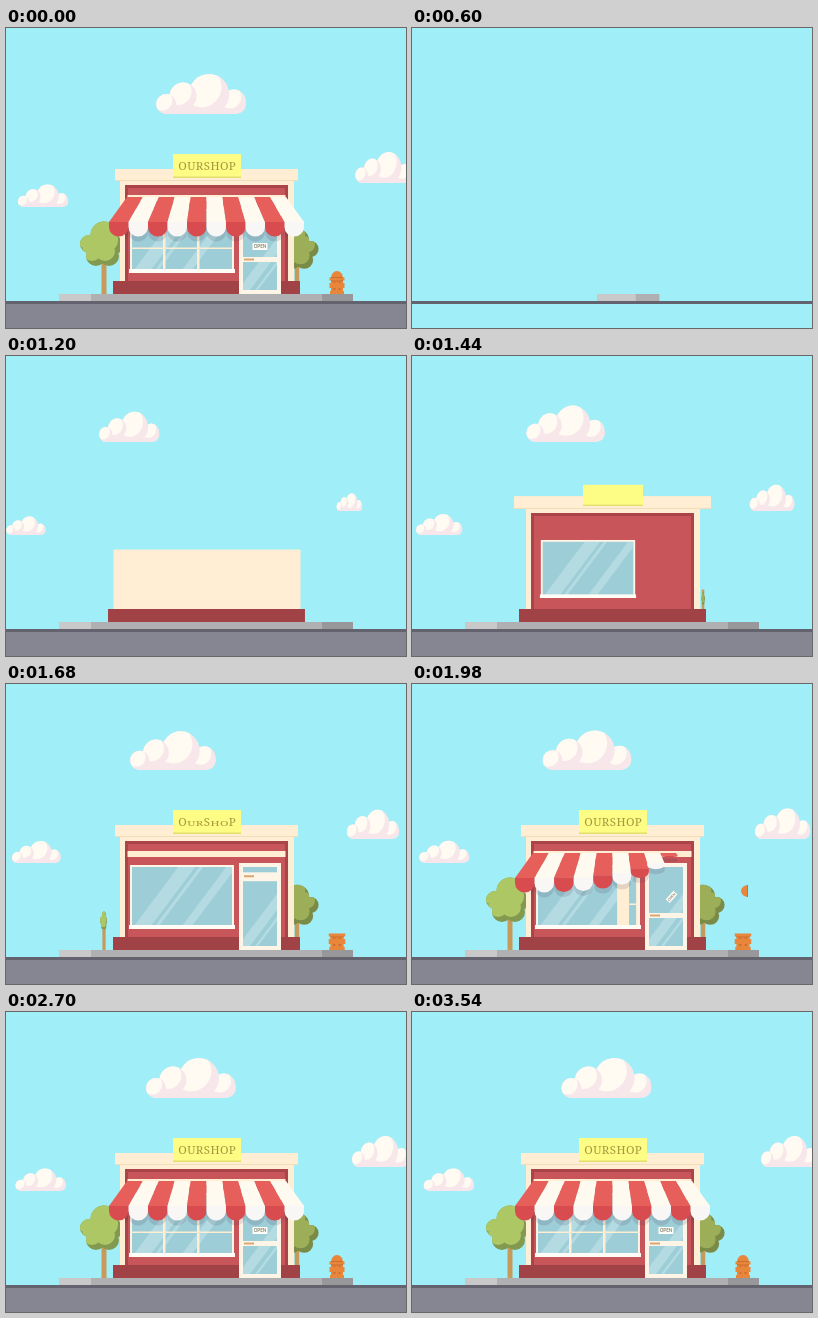
Animation of 400x300 px, one loop 3.6 s. Source, as an HTML page with a canvas:

```html
<!DOCTYPE html>
<html lang="en">
<head>
<meta charset="utf-8">
<title>Little shop</title>
<style>
html, body { margin: 0; width: 100%; height: 100%; overflow: hidden; background: #a0eef7; }
canvas { display: block; }
</style>
</head>
<body>
<canvas id="stage" width="400" height="300"></canvas>
<script>
const ctx = document.getElementById('stage').getContext('2d');
const LOOP = 3600, STEP = 60, SIGN = 'OURSHOP';
const CREAM = '#ffeed3', TRIM = '#fff5e6', GLASS = '#9dcdd6', GLEAM = '#b4dbe2';
let t = 0;

const mix = (a, b, k) => a + (b - a) * k;
const phase = (start, length) => Math.min(1, Math.max(0, (t - start) / length));
const easeOut = x => 1 - (1 - x) ** 3;
const easeInOut = x => x < .5 ? 2 * x * x : 1 - 2 * (1 - x) ** 2;
const overshoot = x => x <= 0 ? 0 : 1 + 2.7 * (x - 1) ** 3 + 1.7 * (x - 1) ** 2;

function rect(color, x, y, w, h) {
  ctx.fillStyle = color;
  ctx.fillRect(x, y, w, h);
}

function poly(color, ...points) {
  ctx.fillStyle = color;
  ctx.beginPath();
  for (const [x, y] of points) ctx.lineTo(x, y);
  ctx.fill();
}

// Draw around a pivot with its own scale and rotation.
function at(x, y, sx, sy, angle, draw) {
  if (sx === 0 || sy === 0) return;
  ctx.save();
  ctx.translate(x, y);
  ctx.rotate(angle);
  ctx.scale(sx, sy);
  draw();
  ctx.restore();
}

function circles(list) {
  ctx.beginPath();
  for (const [x, y, r] of list) {
    ctx.moveTo(x + r, y);
    ctx.arc(x, y, r, 0, 7);
  }
}

// Blob in the dark tone, covered by a shifted copy in the light tone.
function shaded(list, dark, light, dx, dy) {
  ctx.save();
  circles(list);
  ctx.fillStyle = dark;
  ctx.fill();
  ctx.clip();
  ctx.translate(dx, dy);
  circles(list);
  ctx.fillStyle = light;
  ctx.fill();
  ctx.restore();
}

function cloud(x, y, sx, sy, drift, lag, shrink) {
  const rest = Math.exp(-.004 * (t - 1200));
  const grow = Math.max(0, 1 - shrink * rest);
  at(x - drift * (3540 - t) - lag * rest, y, sx * grow, sy * grow ** .7, 0, () => {
    const pink = '#f7e7ea', white = '#fffaf2';
    ctx.fillStyle = pink;
    ctx.beginPath();
    ctx.roundRect(-45, -20, 90, 20, 10);
    ctx.fill();
    for (const [bx, by, r] of [[33, -13, 11.5], [8, -20, 20], [-18, -18, 13.5], [-35, -10, 10]])
      shaded([[bx, by, r]], pink, white, -r * .38, -r * .34);
  });
}

function ground() {
  const line = easeOut(phase(60, 480)) * 200;
  rect('#868692', 0, 275, 400, 25 * easeOut(phase(600, 240)));
  rect('#62636e', 200 - line, 273, line * 2, 3);
  const k = easeInOut(phase(540, 255));
  if (!k) return;
  const left = mix(202, 53, k), right = mix(235, 347, k);
  const lit = mix(241, 85, k), dim = Math.min(right, mix(240, 316, k));
  rect('#b0b0b3', left, 266, right - left, 7);
  rect('#c9c9ca', left, 266, lit - left, 7);
  rect('#98989b', dim, 266, right - dim, 7);
}

function tree(x, start, size, light, dark) {
  const p = phase(start, 200), flip = Math.sign(size);
  if (!p) return;
  at(x, 266, size, Math.abs(size), 0, () => {
    const w = mix(2, 5, p);
    rect('#c79a5b', -w / 2, -36, w, 36);
    at(0, -16, p * p, p, 0, () => shaded(
      [[0, -43, 13.5], [-15, -34, 9], [6, -33, 12], [-8, -22, 10], [5, -22, 10], [-6, -34, 11]],
      dark, light, -4 * flip, -5));
  });
}

function pane(x, y, w, h, gleams) {
  rect(GLASS, x, y, w, h);
  ctx.save();
  ctx.beginPath();
  ctx.rect(x, y, w, h);
  ctx.clip();
  for (const [gx, gw] of gleams)
    poly(GLEAM, [gx, y + h], [gx + gw, y + h], [gx + gw + h * .75, y], [gx + h * .75, y]);
  ctx.restore();
}

// Bar that slides in from the right edge of the window while it thins out.
function mullion(rest, start) {
  const k = easeInOut(phase(start, 270));
  const x = mix(226, rest, k), right = Math.min(226, x + mix(16, 2.5, k));
  rect(CREAM, x, 183, right - x, 59);
  return right;
}

function shopWindow() {
  const p = overshoot(phase(1380, 200));
  at(176, 213, p, p, 0, () => {
    ctx.translate(-176, -213);
    rect(TRIM, 124, 181, 104, 62);
    pane(126, 183, 100, 59, [[128, 17], [149, 4], [176, 10]]);
    const edge = mullion(157, 1875);
    mullion(191, 1935);
    rect(CREAM, edge, 219.5, 226 - edge, 1.5);
    rect(CREAM, 126, 219.5, (edge - 126) * phase(2040, 120), 1.5);
    rect('#fffdf6', 123, 241, 106, 4);
  });
}

function door() {
  const p = overshoot(phase(1440, 180));
  at(254, 266, p, p, 0, () => {
    ctx.translate(-254, -266);
    rect(TRIM, 233, 179, 42, 87);
    pane(237, 183, 34, 79, [[232, 12], [249, 3]]);
    const k = easeInOut(phase(1650, 240)), y = mix(187, 229, k);
    rect(TRIM, 236, y, 36, mix(9, 5, k));
    rect('#dba673', 238, y + mix(3, 1.5, k), 10, 2);
  });
  const b = overshoot(phase(1950, 360)), size = b && .65 + .35 * b;
  at(mix(262.5, 254, b), mix(210, 218.5, b), size, size, -1.3 * (1 - b), () => {
    rect('#fffdf8', -7.5, -3.5, 15, 7);
    ctx.fillStyle = '#85836f';
    ctx.font = 'bold 4.6px Lato, sans-serif';
    ctx.textAlign = 'center';
    ctx.fillText('OPEN', 0, 1.7);
  });
}

function stripe(i, body, valance) {
  const k = easeOut(phase(1690 + i * 35, 280));
  if (!k) return;
  const top = 121 + 15.9 * i, left = mix(top, 103 + 19.5 * i, k);
  const w = mix(15.9, 19.5, k), y = 169 + 25 * k, side = y + 5 * k;
  ctx.fillStyle = valance;
  ctx.beginPath();
  ctx.moveTo(left, y - .3);
  ctx.lineTo(left, side);
  ctx.ellipse(left + w / 2, side, w / 2, 9.5 * k, 0, Math.PI, 0, true);
  ctx.lineTo(left + w, y - .3);
  ctx.fill();
  poly(body, [top, 169], [top + 15.9, 169], [left + w, y], [left, y]);
}

function awning() {
  const shade = 'rgba(70,60,90,.15)';
  ctx.save();
  ctx.beginPath();
  ctx.rect(119, 169, 163, 84);
  ctx.clip();
  ctx.translate(0, 5);
  for (let i = 0; i < 10; i++) stripe(i, shade, shade);
  ctx.restore();
  for (let i = 0; i < 10; i++)
    i % 2 ? stripe(i, '#fffaf0', '#f8f7f6') : stripe(i, '#e75f5b', '#d84c50');
}

function shopSign() {
  const p = overshoot(phase(1380, 210));
  at(201, 150, p, p, 0, () => {
    rect('#fdfc85', -34, -24, 68, 24);
    rect('#e6de6c', -34, -1.5, 68, 1.5);
    ctx.fillStyle = '#a6983d';
    ctx.font = '11.5px "Noto Serif", serif';
    ctx.textAlign = 'left';
    const gap = .4;
    let x = -(ctx.measureText(SIGN).width + gap * (SIGN.length - 1)) / 2;
    [...SIGN].forEach((letter, i) => {
      at(x, -7.7, 1, phase(i % 3 ? 1600 : 1480, 200) ** .4, 0, () => ctx.fillText(letter, 0, 0));
      x += ctx.measureText(letter).width + gap;
    });
  });
}

function building() {
  const rise = phase(1080, 240), bulge = Math.sin(Math.PI * rise);
  at(201, 253, 1 + .075 * bulge, rise ** .75, 0, () => rect(CREAM, -87, -100, 174, 100));
  const inner = easeOut(phase(1260, 180));
  at(200.5, 253, 1, inner, 0, () => {
    rect('#a8444a', -81.5, -96, 163, 96);
    rect('#c8555a', -78.5, -93, 157, 93);
  });
  at(200.5, 266, 1 + .053 * bulge, easeOut(phase(960, 120)), 0,
    () => rect('#a04246', -93.5, -13, 187, 13));
  const rail = overshoot(phase(1500, 150)) * 79;
  rect(CREAM, 200.5 - rail, 167, rail * 2, 6);
  const roof = overshoot(phase(1290, 210));
  at(200.5, 153, roof, roof, 0, () => {
    rect(CREAM, -91.5, -12, 183, 12);
    rect('#f3dcba', -91.5, -1, 183, 1);
  });
  shopWindow();
  door();
  awning();
  shopSign();
}

function hydrant() {
  const p = overshoot(phase(1500, 120)), settle = phase(2130, 90);
  const orange = '#e8863c', dark = '#c9702f';
  at(331, 266, p * mix(1.1, 1, settle), p, 0, () => {
    rect(orange, -6, -16, 12, 16);
    rect(dark, -3.5, -12, 2, 8);
    rect(dark, 1.5, -12, 2, 8);
    rect(orange, -7.5, -16.5, 15, 3);
    rect(dark, -6, -13.5, 12, 1);
    rect(orange, -7.5, -11, 15, 5);
    rect(orange, -7, -3, 14, 3);
  });
  const u = phase(1800, 360);
  if (!u) return;
  const arc = Math.sin(Math.PI * u);
  at(331 + 5 * arc, 250 - 43 * 4 * u * (1 - u), 1, 1, -Math.PI / 2 * arc, () => {
    ctx.fillStyle = orange;
    ctx.beginPath();
    ctx.ellipse(0, 0, 6, 7, 0, Math.PI, 0);
    ctx.fill();
    rect(dark, -6, -1, 12, 1);
  });
}

function draw(now) {
  t = Math.floor(now % LOOP / STEP) * STEP || LOOP;
  rect('#a0eef7', 0, 0, 400, 300);
  cloud(194.5, 86, 1, 1, .0112, 45, .33);
  cloud(37, 179, .56, .56, .0027, 10.7, .22);
  cloud(377.5, 155, .63, .775, .0036, 25.6, .55);
  ground();
  tree(291, 1380, -.9, '#9caf58', '#7a8b48');
  tree(98, 1600, 1, '#aec765', '#829a50');
  building();
  hydrant();
}

const begin = performance.now();
function loop() {
  draw(performance.now() - begin);
  requestAnimationFrame(loop);
}
loop();
</script>
</body>
</html>
```
